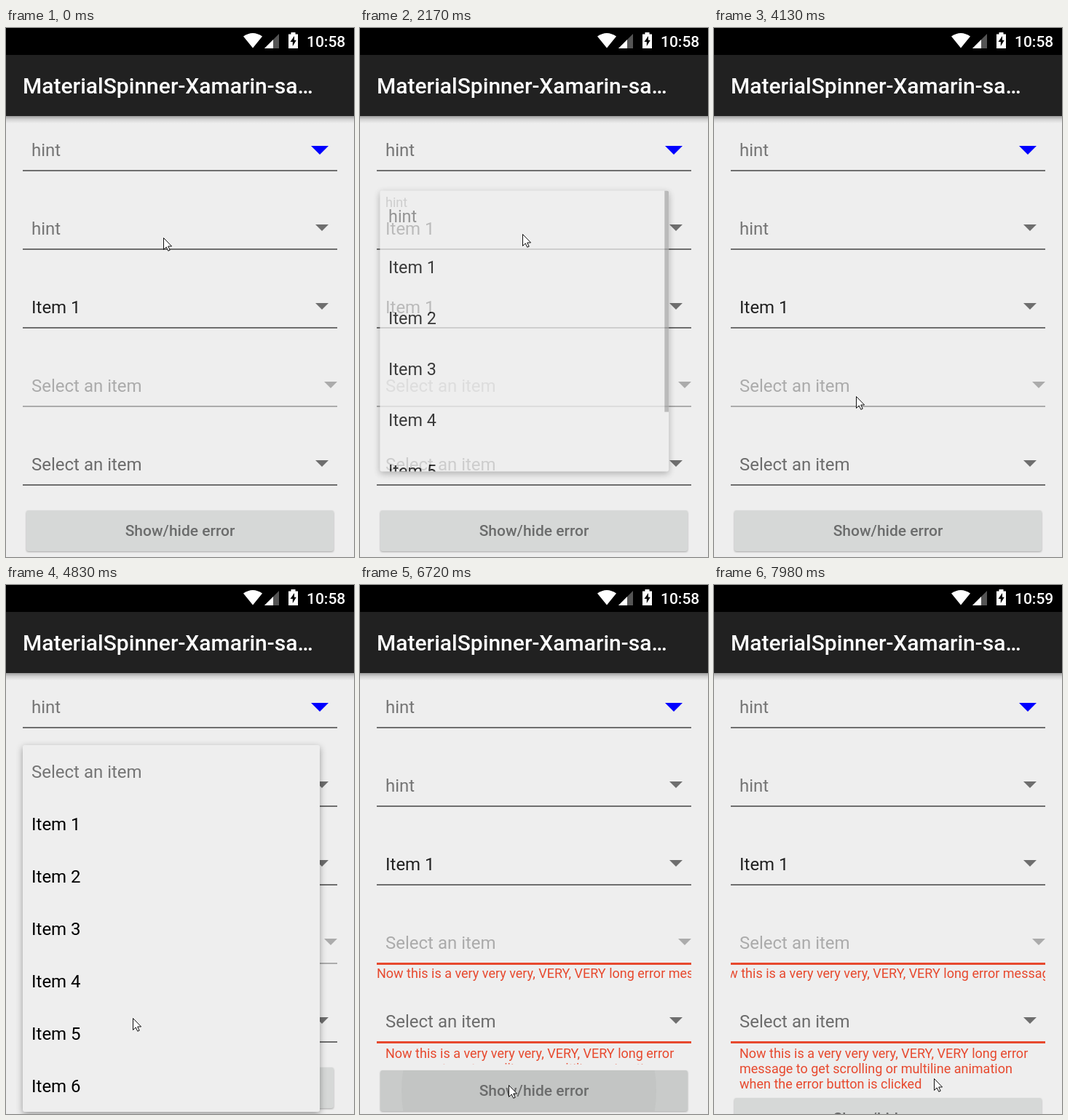
An HTML page for the animation above (8 s loop, 478 px wide and 727 px high).

```html
<!DOCTYPE html>
<html lang="en">
<head>
<meta charset="utf-8">
<title>Material spinner demo</title>
<style>
  html, body { margin: 0; width: 100%; height: 100%; overflow: hidden; background: #eee; }
  svg { display: block; }
  text { font: 24px Roboto, sans-serif; white-space: pre; }
  .small { font-size: 18px; }
  .title { font-size: 30px; font-weight: 500; fill: #fff; }
  .clock { font-size: 21px; font-weight: 500; fill: #fff; }
  .btn { font-size: 21px; font-weight: 500; fill: #6b6c6c; text-anchor: middle; }
  .err { fill: #e7492e; }
  .card { fill: #eee; filter: drop-shadow(0 3px 5px rgba(0,0,0,.36)); }
  .raised { fill: #d6d8d7; filter: drop-shadow(0 1px 1px rgba(0,0,0,.3)); }
</style>
</head>
<body>
<svg id="stage" width="478" height="727" viewBox="0 0 478 727"></svg>
<script>
const LOOP = 8000, STEP = 70;
const GREY = '#6e6e6e', DIM = '#ababab', DARK = '#212121', RED = '#e7492e';
const stage = document.getElementById('stage');
const $ = id => document.getElementById(id);

const rect = (x, y, w, h, fill, more = '') =>
  `<rect x="${x}" y="${y}" width="${w}" height="${h}" fill="${fill}" ${more}/>`;
const text = (x, y, str, fill, more = '') =>
  `<text x="${x}" y="${y}" fill="${fill}" ${more}>${str}</text>`;
const arrow = (x, y, w, fill) => `<path d="M${x} ${y}h${w}l${-w / 2} ${w / 2}z" fill="${fill}"/>`;

const message = [
  'Now this is a very very very, VERY, VERY long error',
  'message to get scrolling or multiline animation',
  'when the error button is clicked'
];

function field(n, str, color, line, tip) {
  const y = 195 + n * 108;
  return text(35, y - 19, str, color, `id="value${n}"`) +
    rect(23, y, 432, 2, line, `id="line${n}"`) + tip;
}

function popup(id, top, height, first) {
  let rows = '';
  for (let i = 0; i < 7; i++)
    rows += text(35, top + 45 + i * 72, i ? 'Item ' + i : first, i ? '#000' : '#757575');
  const bar = height < 504 ? rect(425, top, 6, height * height / 504, '#a9a9a9') : '';
  return `<clipPath id="${id}Clip">${rect(23, top, 408, height, '#000', 'rx="3"')}</clipPath>
    <g id="${id}">${rect(23, top, 408, height, '#eee', 'rx="3" class="card"')}
    <g clip-path="url(#${id}Clip)">${rect(23, top, 408, 72, '#000', `id="${id}Press"`)}${rows}${bar}</g></g>`;
}

const statusBar = rect(0, 0, 478, 37, '#000') +
  `<path d="M339 27.5L326 11.6Q339 2.6 352 11.6z" fill="#fff"/>
   <path d="M375 8V28H355z" fill="#545454"/><path d="M367 16V28H355z" fill="#fff"/>
   <path d="M388 8.5h3.5V6h6v2.5H401V28H388z" fill="#fff"/>
   <path d="M396 11l-5.5 8h3.3v6l5-8.3h-2.8z" fill="#000"/>` +
  text(413, 26, '10:58', '#fff', 'id="clock" class="clock"');

const toolbar = rect(0, 121, 478, 10, 'url(#fall)') + rect(0, 37, 478, 84, DARK) +
  text(23, 90, 'MaterialSpinner-Xamarin-sa…', '#fff', 'class="title"');

const errors = `<g id="errors">
  ${rect(23, 519, 432, 3, RED)}${rect(23, 627, 432, 3, RED)}
  <g clip-path="url(#lineClip)">${text(23, 540, message.join(' '), RED, 'id="marquee" class="small"')}</g>
  <g clip-path="url(#linesClip)">${message.map((s, i) =>
    text(35, 650 + i * 21, s, RED, 'class="small"')).join('')}</g></g>`;

const button = `<g id="button">${rect(28, 663, 422, 56, '#d6d8d7', 'rx="3" class="raised"')}
  <g clip-path="url(#btnClip)" id="ink">${rect(28, 663, 422, 56, '#000', 'opacity=".06"')}
  <circle id="ripple" cx="232" cy="691" fill="#000" opacity=".03"/></g>
  ${text(239, 698, 'Show/hide error', '#6b6c6c', 'class="btn"')}</g>`;

stage.innerHTML = `<defs>
  <linearGradient id="fall" x2="0" y2="1"><stop stop-color="#000" stop-opacity=".34"/>
  <stop offset=".45" stop-color="#000" stop-opacity=".12"/><stop offset="1" stop-opacity="0"/></linearGradient>
  <clipPath id="lineClip">${rect(23, 522, 432, 26, '#000')}</clipPath>
  <clipPath id="linesClip">${rect(23, 630, 432, 24, '#000', 'id="linesBox"')}</clipPath>
  <clipPath id="btnClip">${rect(28, 663, 422, 56, '#000', 'rx="3"')}</clipPath></defs>` +
  rect(0, 0, 478, 727, '#eee') + statusBar + toolbar +
  field(0, 'hint', '#757575', GREY, arrow(419, 162, 24, '#00f')) +
  text(35, 246, 'hint', GREY, 'id="label" class="small"') +
  field(1, 'hint', '#757575', GREY, arrow(425, 270, 18, GREY)) +
  field(2, 'Item 1', DARK, GREY, arrow(425, 378, 18, GREY)) +
  field(3, 'Select an item', DIM, DIM, arrow(437, 486, 18, DIM)) +
  field(4, 'Select an item', '#6c6c6c', GREY, arrow(425, 594, 18, GREY)) +
  button + errors +
  popup('short', 222, 397, 'hint') + popup('tall', 220, 504, 'Select an item') +
  `<path id="cursor" d="M.5 .5V16.5L4.2 13L6.8 18.3L9.2 17.2L6.7 12H11.6z"
     fill="#fff" stroke="#111" stroke-width="1"/>`;

// time, x, y of the pointer tip
const path = [
  [0, 216, 288], [350, 216, 288], [630, 225, 269], [770, 225, 269], [980, 225, 330],
  [1680, 225, 330], [1890, 226, 280], [2310, 222, 284], [2660, 189, 413], [2800, 189, 413],
  [3080, 192, 257], [3360, 192, 257], [3640, 195, 480], [3780, 195, 480], [4130, 195, 506],
  [4270, 174, 626], [4340, 174, 626], [4480, 174, 595], [4970, 174, 595], [5180, 166, 430],
  [5390, 180, 264], [5810, 180, 264], [5950, 178, 346], [6370, 204, 687], [7280, 204, 687],
  [7700, 302, 678], [LOOP, 302, 678]
];

const ramp = (t, start, length) => Math.min(1, Math.max(0, (t - start) / length));
const within = (t, a, b) => t >= a && t < b;
const set = (id, attrs) => { for (const k in attrs) $(id).setAttribute(k, attrs[k]); };

function pointer(t) {
  const i = path.findIndex(p => p[0] > t);
  const [t0, x0, y0] = path[i - 1], [t1, x1, y1] = path[i];
  const p = (t - t0) / (t1 - t0);
  return `translate(${Math.round(x0 + (x1 - x0) * p)} ${Math.round(y0 + (y1 - y0) * p)})`;
}

// one showing: opens, row pressed, closes
function showPopup(id, t, py, top, shows) {
  const s = shows.find(s => within(t, s.open, s.close + 200));
  $(id).style.display = s ? '' : 'none';
  if (!s) return;
  const grow = 1 - (1 - ramp(t, s.open, 180)) ** 2;
  const level = Math.min(grow, 1 - ramp(t, s.close, 200));
  set(id, {
    opacity: level,
    transform: `translate(182 ${py}) scale(${0.89 + 0.11 * level}) translate(-182 ${-py})`
  });
  set(id + 'Press', {
    y: top + s.row * 72,
    opacity: 0.032 * ramp(t, s.press - 70, 140) * (1 - ramp(t, s.close, 100))
  });
}

function draw(t) {
  set('cursor', { transform: pointer(t) });
  $('clock').textContent = t < 7000 ? '10:58' : '10:59';

  showPopup('short', t, 275, 222, [
    { open: 130, press: 1120, close: 1370, row: 1 },
    { open: 2080, press: 3080, close: 3210, row: 0 }
  ]);
  showPopup('tall', t, 578, 220, [{ open: 4640, press: 5740, close: 5850, row: 0 }]);

  const picked = within(t, 1370, 3220);
  $('value1').textContent = picked ? 'Item 1' : 'hint';
  set('value1', { fill: picked ? DARK : '#757575' });
  const held = within(t, 70, 200) || within(t, 1930, 2100);
  set('line1', { fill: held ? '#000' : GREY });
  set('line4', { fill: within(t, 4480, 4690) ? '#000' : GREY });

  const up = ramp(t, 1370, 240) * (1 - ramp(t, 3340, 300));
  set('label', { y: 246 + 6 * (1 - up), opacity: up * (0.8 * up + 0.2), fill: held ? '#000' : GREY });

  const drop = 42 * (1 - Math.cos(Math.PI * ramp(t, 6660, 300))) / 2;
  $('errors').style.display = t >= 6650 ? '' : 'none';
  set('linesBox', { height: 24.4 + drop });
  set('marquee', { x: 23 - Math.max(0, t - 7560) * 0.064 });
  set('button', { transform: `translate(0 ${Math.round(drop)})` });
  set('ink', { opacity: ramp(t, 6440, 140) * (1 - ramp(t, 6930, 280)) });
  set('ripple', { r: 40 + 135 * Math.max(0, t - 6510) / 210 });
}

const begin = performance.now();
function tick() {
  const t = (performance.now() - begin) % LOOP;
  draw(Math.floor(t / STEP) * STEP);
  requestAnimationFrame(tick);
}
tick();
</script>
</body>
</html>
```
